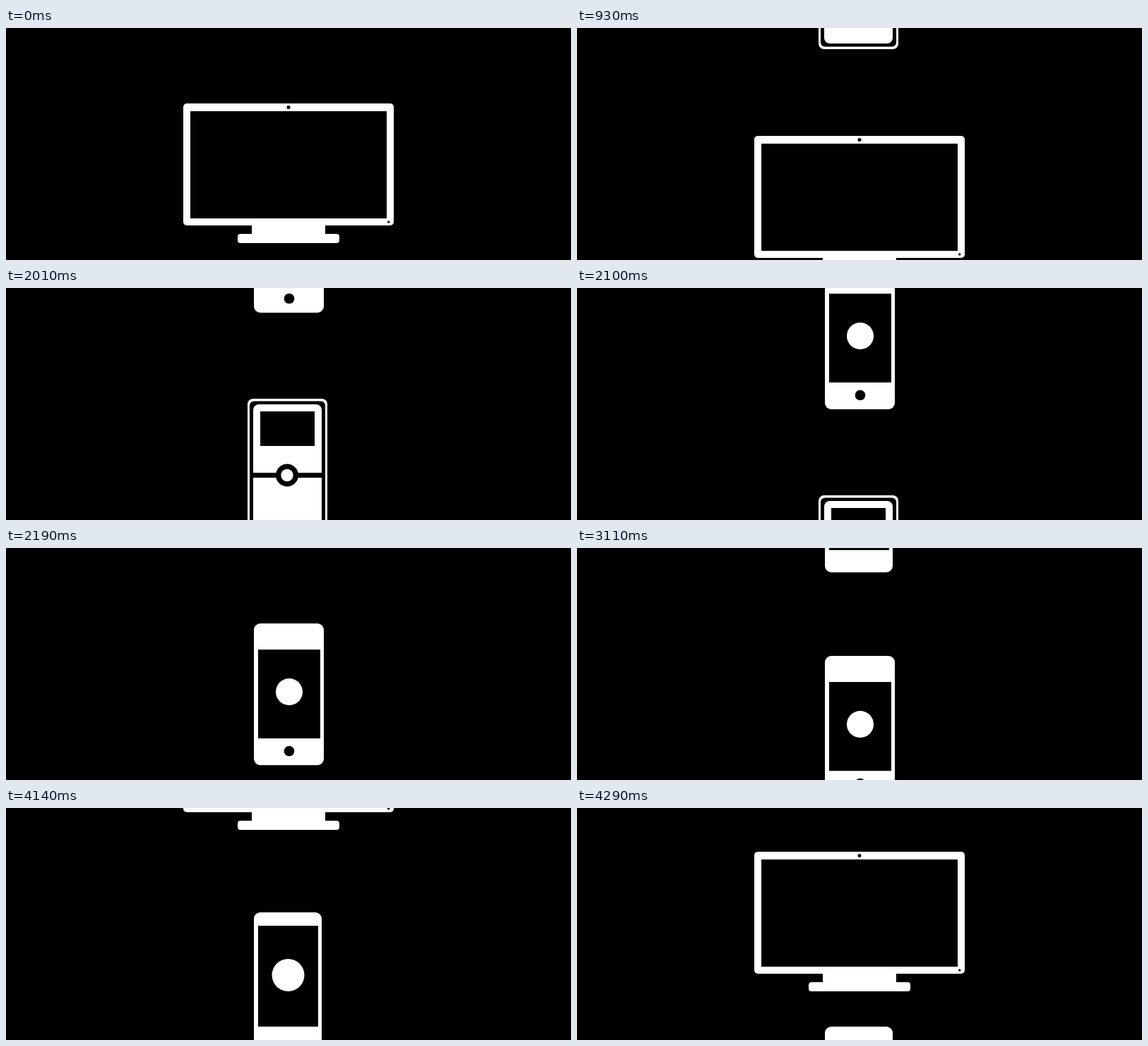
Write an HTML page that moves like this. It is 800 by 329 pixels and loops after 4.32 s.

```html
<!DOCTYPE html>
<html lang="en">
<head>
<meta charset="utf-8">
<title>Devices</title>
<style>
  html, body { margin: 0; width: 100%; height: 100%; overflow: hidden; background: #000; }
  svg { display: block; width: 100%; height: 100%; fill: #fff; }
  .k { fill: #000; }
</style>
</head>
<body>
<svg viewBox="0 0 800 329">
  <g id="monitor">
    <rect x="251" y="107" width="298" height="173" rx="5"/>
    <rect class="k" x="261" y="118" width="278" height="152"/>
    <circle class="k" cx="400" cy="112.5" r="2.5"/>
    <circle class="k" cx="541.7" cy="275" r="1.7"/>
    <rect x="348" y="279" width="104" height="14"/>
    <rect x="328" y="292" width="144" height="13" rx="4"/>
  </g>
  <g id="player">
    <rect x="342" y="111" width="113" height="193" rx="8"/>
    <rect class="k" x="345" y="114.5" width="107" height="186" rx="6"/>
    <rect x="350" y="119" width="97" height="177" rx="8"/>
    <rect class="k" x="360" y="129" width="77" height="49"/>
    <rect class="k" x="350" y="216" width="97" height="7"/>
    <circle class="k" cx="398" cy="219.5" r="16"/>
    <circle cx="398" cy="219.5" r="8.7"/>
  </g>
  <g id="phone">
    <rect x="351" y="107" width="99" height="201" rx="9"/>
    <rect class="k" x="357" y="144" width="88" height="126"/>
    <circle cx="401" cy="204" r="19"/>
    <circle class="k" cx="401" cy="288" r="7.3"/>
  </g>
  <g id="tall">
    <rect x="351" y="115" width="96" height="193.5" rx="9"/>
    <rect class="k" x="357" y="134" width="85" height="143"/>
    <circle cx="399.5" cy="204" r="23"/>
  </g>
</svg>
<script>
const LOOP = 4320, TICK = 30, STEPS = 7;

// at: when a device starts to leave; drop: travel out; rise: travel in from above
const devices = [
  { id: 'monitor', at: 930, drop: 320, rise: 320 },
  { id: 'player', at: 2010, drop: 320, rise: 320 },
  { id: 'phone', at: 3110, drop: 320, rise: 319 },
  { id: 'tall', at: 4140, drop: 227, rise: 320 }
].map(d => ({ ...d, el: document.getElementById(d.id) }));

function place(d, y) {
  d.el.setAttribute('display', y === null ? 'none' : 'inline');
  if (y !== null) d.el.setAttribute('transform', `translate(0 ${Math.ceil(y)})`);
}

function draw(t) {
  let i = devices.findIndex(d => t < d.at + STEPS * TICK - TICK);
  if (i < 0) i = devices.length - 1;
  const cur = devices[i], next = devices[(i + 1) % devices.length];
  const step = Math.min(STEPS, Math.max(0, Math.floor((t - cur.at) / TICK) + 1));
  const p = step / STEPS;
  for (const d of devices) {
    if (d === cur) place(d, d.drop * p);
    else if (d === next && step) place(d, -d.rise * (1 - p));
    else place(d, null);
  }
}

const start = performance.now();
function frame() {
  draw((performance.now() - start) % LOOP);
  requestAnimationFrame(frame);
}
draw(0);
requestAnimationFrame(frame);
</script>
</body>
</html>
```
